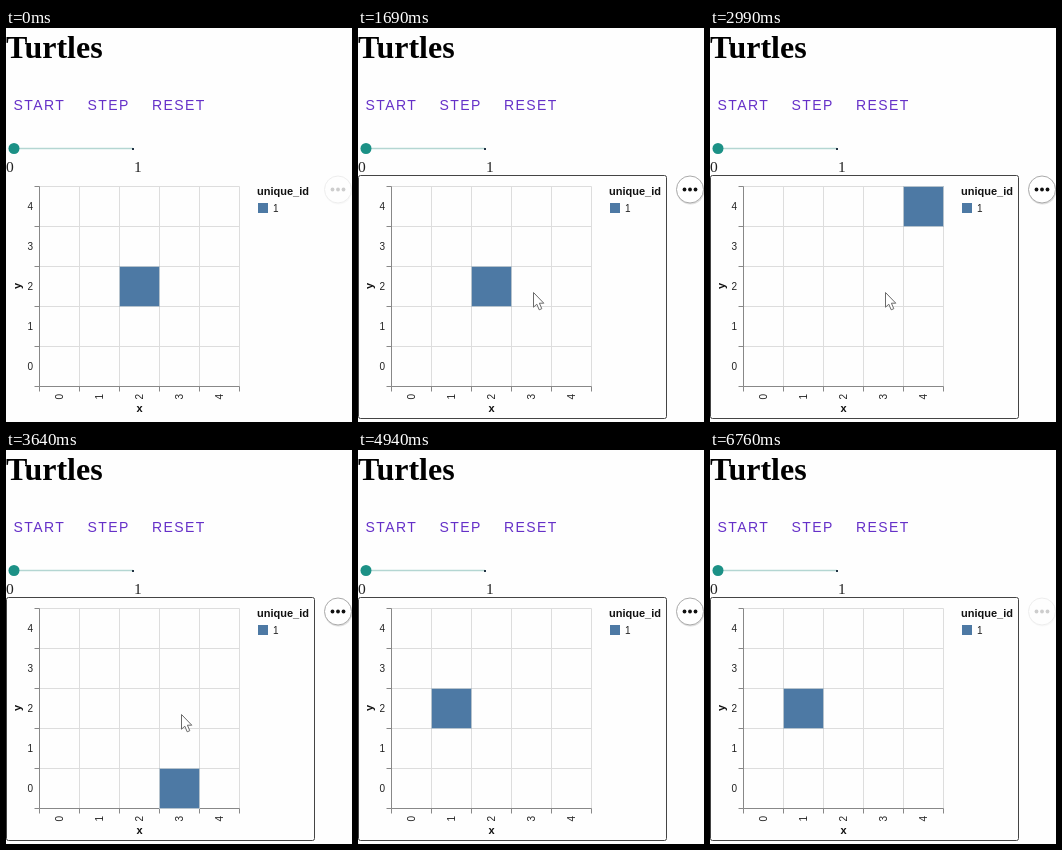
Write an HTML page that moves like this. It is 346x394 px and loops after 6890 ms.

```html
<!DOCTYPE html>
<html lang="en">
<head>
<meta charset="utf-8">
<title>Turtles</title>
<style>
  html, body { margin: 0; width: 100%; height: 100%; overflow: hidden; background: #fefefe; }
  svg { display: block; width: 346px; height: 394px; }
  text { font-family: "Liberation Sans", Arial, sans-serif; }
  .serif { font-family: "Liberation Serif", "Times New Roman", serif; }
  .head { font-size: 32px; font-weight: bold; }
  .num { font-size: 15.5px; fill: #222; }
  .btn { font-size: 14px; letter-spacing: 1.4px; fill: #6530c8; }
  .label { font-size: 10px; fill: #222; }
  .name { font-size: 11px; font-weight: bold; fill: #111; }
  .grid, .axis { fill: none; stroke: #ddd; }
  .axis { stroke: #888; }
</style>
</head>
<body>
<svg viewBox="0 0 346 394">
  <text class="serif head" x="0" y="30">Turtles</text>
  <text class="btn" x="7.5" y="82">START</text>
  <text class="btn" x="81.5" y="82">STEP</text>
  <text class="btn" x="146" y="82">RESET</text>

  <path d="M8 120.5H127" stroke="#b4d6d2" stroke-width="1.3"/>
  <rect x="126" y="120" width="2" height="2" fill="#234"/>
  <circle cx="8" cy="120.5" r="5.5" fill="#1c9186"/>
  <text class="serif num" x="0" y="144">0</text>
  <text class="serif num" x="128" y="144">1</text>

  <g id="plot"></g>
  <rect id="turtle" width="40" height="40" fill="#4d79a4" stroke="#b5c2cc"/>
  <text class="name" x="133.5" y="384" text-anchor="middle">x</text>
  <text class="name" transform="translate(15 258) rotate(-90)" text-anchor="middle">y</text>
  <text class="name" x="251" y="166.5">unique_id</text>
  <rect x="252" y="175" width="10" height="10" fill="#4d79a4"/>
  <text class="label" x="267" y="183.5">1</text>

  <rect id="focus" x="0.5" y="147.5" width="308" height="243" rx="2" fill="none" stroke="#444"/>
  <g id="menu">
    <circle cx="332.5" cy="162.5" r="14" fill="#000" opacity=".12"/>
    <circle cx="332" cy="161.5" r="13.5" fill="#fff" stroke="#aaa"/>
    <g fill="#111">
      <circle cx="326.5" cy="161.5" r="1.9"/>
      <circle cx="332" cy="161.5" r="1.9"/>
      <circle cx="337.5" cy="161.5" r="1.9"/>
    </g>
  </g>
  <path id="cursor" d="M.5 .5V15.2L3.8 12.2L6.2 17.8L8.8 16.7L6.4 11.2H10.8Z"
        fill="#fff" stroke="#6a6a6a" stroke-linejoin="round"/>
</svg>
<script>
const LOOP = 6890, TICK = 130, CELL = 40, LEFT = 33.5, TOP = 158.5, SIZE = 200;
const $ = id => document.getElementById(id);

// [time, column, row]
const moves = [
  [0, 2, 2], [1950, 3, 2], [2340, 4, 2], [2730, 4, 3], [2990, 4, 4],
  [3250, 4, 0], [3640, 3, 0], [4030, 2, 0], [4290, 1, 0], [4680, 1, 1], [4940, 1, 2]
];
// [time, opacity]
const fade = [[0, .2], [520, .2], [1040, 1], [6370, 1], [6760, .2], [LOOP, .2]];

function buildPlot() {
  const line = (cls, d) => `<path class="${cls}" d="${d}"/>`;
  let grid = '', axis = '', labels = '';
  for (let i = 0; i <= 5; i++) {
    const x = LEFT + i * CELL, y = TOP + i * CELL;
    grid += line('grid', `M${x} ${TOP}v${SIZE}M${LEFT} ${y}h${SIZE}`);
    axis += line('axis', `M${x} ${TOP + SIZE}v5M${LEFT} ${y}h-5`);
    if (i === 5) break;
    labels += `<text class="label" x="27" y="${y + 23}" text-anchor="end">${4 - i}</text>`
      + `<text class="label" transform="translate(${x + 23} 366) rotate(-90)" text-anchor="end">${i}</text>`;
  }
  axis += line('axis', `M${LEFT} ${TOP}v${SIZE}h${SIZE}`);
  $('plot').innerHTML = grid + axis + labels;
}

function lerpTable(table, t) {
  const i = table.findIndex(step => step[0] > t);
  const [t0, a] = table[i - 1], [t1, b] = table[i];
  return a + (b - a) * (t - t0) / (t1 - t0);
}

function cursorAt(t) {
  if (t >= 520 && t < 4940) {
    const rest = 1 - Math.min(1, (t - 520) / 780);
    const k = rest ** 1.6;
    return [175 + 18 * k, 264 + 122 * k];
  }
  if (t >= 6240 && t < 6500) {
    const k = (t - 6240) / TICK;
    return [163 - 20 * k, 290 + 52 * k];
  }
  return null;
}

function draw(now) {
  const t = Math.floor(now % LOOP / TICK) * TICK;
  const [, col, row] = moves.filter(m => m[0] <= t).pop();
  $('turtle').setAttribute('x', LEFT + col * CELL);
  $('turtle').setAttribute('y', TOP + (4 - row) * CELL);
  $('focus').style.display = t >= 1560 ? '' : 'none';
  $('menu').setAttribute('opacity', lerpTable(fade, t));
  const pos = cursorAt(t);
  $('cursor').style.display = pos ? '' : 'none';
  if (pos) $('cursor').setAttribute('transform', `translate(${pos})`);
}

buildPlot();
const start = performance.now();
(function loop() {
  draw(performance.now() - start);
  requestAnimationFrame(loop);
})();
</script>
</body>
</html>
```
